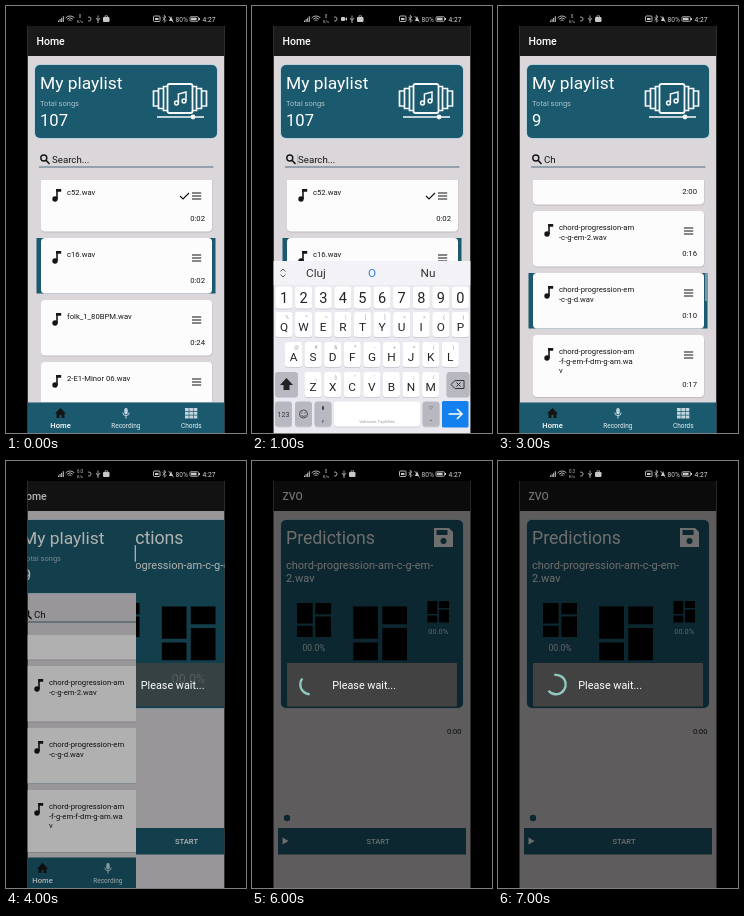
An HTML page with a canvas that plays this animation: 240x427 px, repeating every 8 s.

```html
<!DOCTYPE html>
<html lang="en">
<head>
<meta charset="utf-8">
<title>Playlist search</title>
<style>
html, body { margin: 0; width: 100%; height: 100%; overflow: hidden; background: #000; }
canvas { display: block; width: 240px; height: 427px; }
</style>
</head>
<body>
<canvas id="stage"></canvas>
<script>
const W = 240, H = 427, LEFT = 21.5, RIGHT = 218.5, STEP = 1000;
const TEAL = '#1b5a6e', PAPER = '#dad6d9', INK = '#151515';
const canvas = document.getElementById('stage');
const scale = Math.max(1, window.devicePixelRatio || 1);
canvas.width = W * scale;
canvas.height = H * scale;
const c = canvas.getContext('2d');

function text(s, x, y, size, color = '#fff', align = 'left', weight = 400) {
  c.font = `${weight} ${size}px Roboto, sans-serif`;
  c.fillStyle = color;
  c.textAlign = align;
  c.fillText(s, x, y);
}
function box(x, y, w, h, color, r = 0) {
  c.fillStyle = color;
  c.beginPath();
  c.roundRect(x, y, w, h, r);
  c.fill();
}
function frame(x, y, w, h, color, width, r = 0) {
  c.strokeStyle = color;
  c.lineWidth = width;
  c.beginPath();
  c.roundRect(x, y, w, h, r);
  c.stroke();
}
function line(points, color, width) {
  c.strokeStyle = color;
  c.lineWidth = width;
  c.beginPath();
  points.forEach(([x, y]) => c.lineTo(x, y));
  c.stroke();
}
function poly(points, color) {
  c.fillStyle = color;
  c.beginPath();
  points.forEach(([x, y]) => c.lineTo(x, y));
  c.fill();
}
function disc(x, y, r, color) {
  c.fillStyle = color;
  c.beginPath();
  c.arc(x, y, r, 0, 7);
  c.fill();
}
function ring(x, y, r, color, width, from = 0, to = 2 * Math.PI) {
  c.strokeStyle = color;
  c.lineWidth = width;
  c.beginPath();
  c.arc(x, y, r, from, to);
  c.stroke();
}
function clipped(x, y, w, h, dx, paint) {
  c.save();
  c.beginPath();
  c.rect(x, y, w, h);
  c.clip();
  c.translate(dx, 0);
  paint();
  c.restore();
}
const dim = a => box(LEFT, 20, RIGHT - LEFT, H - 20, `rgba(0,0,0,${a})`);

function statusBar(speed, recording) {
  const g = '#c9c9c9';
  for (let i = 0; i < 4; i++) box(52 + i * 1.6, 14.5 - i * 1.4, 1, 1.5 + i * 1.4, g);
  for (const r of [2, 4, 6]) ring(64, 16, r, g, 0.9, -2.4, -0.75);
  text(speed, 74, 12, 4.5, g, 'center');
  text('K/s', 74, 17, 4, g, 'center');
  ring(83, 13, 2, g, 0.9, -2, 2);
  let x = 92;
  if (recording) {
    box(89, 11, 4, 4, g, 1);
    poly([[93, 13], [95, 11], [95, 15]], g);
    x = 100;
  }
  line([[x, 9.5], [x, 17]], g, 0.8);
  line([[x - 2, 12], [x, 14.5], [x + 2, 12]], g, 0.8);
  box(x + 5, 11, 6.5, 5, g, 1);
  frame(x + 7, 9.8, 2.5, 2, g, 0.7);
  frame(147.5, 10, 6.5, 5.5, g, 0.9, 1);
  box(149, 12, 3.5, 2, g);
  line([[156.5, 11], [160, 14.5], [158.3, 16.3], [158.3, 9.2], [160, 11], [156.5, 14.5]], g, 0.7);
  poly([[163, 15], [165, 10], [167, 15]], g);
  line([[162.5, 10], [167.5, 16.5]], g, 0.7);
  text('80%', 169.5, 15.7, 6.6, g);
  frame(184, 10.7, 8.5, 4.6, g, 0.8, 1);
  box(185, 11.7, 5.6, 2.6, g);
  box(193, 12, 1, 2, g);
  text('4:27', 196.5, 15.8, 6.7, '#dcdcdc');
}

function header(title) {
  box(LEFT, 20, 197, 30, '#1a1a1a');
  text(title, 30.5, 39, 10.5, '#fff', 'left', 500);
}

function banner(height) {
  frame(29, 59, 182, height, 'rgba(150,205,225,.6)', 1.4, 5);
  box(29, 59, 182, height, TEAL, 5);
}

function note(x, y, color) {
  disc(x, y, 2.7, color);
  box(x + 1.2, y - 10, 1.6, 10, color);
  box(x + 1.2, y - 10, 5, 2.8, color);
}

function playerIcon() {
  const w = '#f4f8fa';
  frame(161.5, 78, 25, 29, w, 1.8, 2);
  for (const side of [-1, 1]) {
    [[16.5, 24], [21.5, 20], [26.5, 15]].forEach(([d, h]) => {
      const inner = side * (d - 4.5), outer = side * d, y = 92.5 - h / 2;
      line([[174 + inner, y], [174 + outer, y], [174 + outer, y + h], [174 + inner, y + h]], w, 1.7);
    });
  }
  ring(170.5, 97, 1.9, w, 1.5);
  ring(178, 95, 1.9, w, 1.5);
  line([[172.4, 97], [172.4, 88], [180, 86], [180, 95]], w, 1.5);
  line([[151, 111], [198, 111]], w, 1.5);
  disc(187, 111, 2.4, w);
}

function song(top, { lines, time, selected, checked }) {
  const extra = Math.max(0, lines.length - 2) * 6.5, height = 55.5 + extra;
  if (selected) box(30.5, top, 179, height, TEAL);
  else box(35, top + 1, 171.5, height, 'rgba(0,0,0,.12)', 4);
  box(35, top, 171, height, '#fdfcfd', 4);
  note(49, top + 23, INK);
  lines.forEach((s, i) => text(s, 61, top + 19 + i * 9.6, 7.7, INK));
  for (const dy of [17, 20, 23]) box(186, top + dy - 0.6, 9.2, 1.2, INK);
  if (checked) line([[174, top + 20], [177, top + 23], [183, top + 17]], INK, 1.2);
  text(time, 199, top + 45 + extra, 7.7, INK, 'right');
}

const allSongs = [
  { lines: ['c52.wav'], time: '0:02', checked: true },
  { lines: ['c16.wav'], time: '0:02', selected: true },
  { lines: ['folk_1_80BPM.wav'], time: '0:24' },
  { lines: ['2-E1-Minor 06.wav'], time: '0:08' }
];
const foundSongs = [
  { lines: ['chord-progression-am', '-am-em-am-g.wav'], time: '2:00' },
  { lines: ['chord-progression-am', '-c-g-em-2.wav'], time: '0:16' },
  { lines: ['chord-progression-em', '-c-g-d.wav'], time: '0:10', selected: true },
  { lines: ['chord-progression-am', '-f-g-em-f-dm-g-am.wa', 'v'], time: '0:17' }
];

function navBar() {
  const pale = '#c3d6de';
  box(LEFT, 396.5, 197, 31, TEAL);
  poly([[49, 407.5], [54.5, 402], [60, 407.5]], INK);
  box(50.5, 407, 8, 5, INK);
  box(53.5, 409, 2, 3, TEAL);
  text('Home', 54.5, 421.5, 7.6, '#fff', 'center', 500);
  box(118.3, 402, 3.4, 6.5, pale, 1.7);
  ring(120, 406.5, 3.2, pale, 0.9, 0, Math.PI);
  box(119.5, 409.5, 1, 3, pale);
  text('Recording', 119.8, 421.5, 6.5, '#e3ecf0', 'center');
  for (let i = 0; i < 9; i++) box(179 + (i % 3) * 4.3, 402 + Math.floor(i / 3) * 3.7, 3.7, 3, pale);
  text('Chords', 185.3, 421.5, 6.5, '#e3ecf0', 'center');
}

function homePage({ songs, count, query, scroll = 0, cursor }) {
  box(LEFT, 20, 197, 407, PAPER);
  header('Home');
  banner(73);
  text('My playlist', 34, 83.3, 17.4);
  text('Total songs', 34, 100, 7.5, '#a9c0c9');
  text(count, 34, 120.3, 16.6);
  playerIcon();
  ring(37.8, 152, 3, INK, 1.4);
  line([[40, 154.3], [43.5, 158]], INK, 1.6);
  text(query, 46, 157.3, 9.7, INK);
  if (cursor) box(45.5, 148, 0.6, 11, '#8a9ba3');
  box(33, 160.5, 174.5, 1, '#4d6f7e');
  clipped(LEFT, 174, 197, 222, 0, () => {
    songs.forEach((s, i) => song(170 + i * 62 - scroll, s));
    if (scroll) box(207, 226, 2, 69, 'rgba(215,210,225,.5)');
  });
  navBar();
}

function key(x, y, w, h, label, size, color = '#fff') {
  box(x, y + 1, w, h, '#cdcdd6', 3);
  box(x, y, w, h, color, 3);
  if (label) text(label, x + w / 2, y + h * 0.76, size, '#222', 'center');
}

function keyboard() {
  const grey = '#b8b8c1', pitch = 19.6;
  box(LEFT, 255, 197, 172, '#eae9f0');
  box(LEFT, 255, 197, 24, '#f3f2f7');
  line([[28.5, 265.5], [31, 263], [33.5, 265.5]], '#444', 0.9);
  line([[28.5, 268.5], [31, 271], [33.5, 268.5]], '#444', 0.9);
  text('Cluj', 64, 271, 11.8, '#333', 'center');
  text('O', 120, 271, 11.8, '#2f7fe0', 'center');
  text('Nu', 176, 271, 11.8, '#333', 'center');
  const rows = [
    ['1234567890', 32, 280.5, 22, 14.5, ''],
    ['QWERTYUIOP', 32, 306, 25, 11.8, '%^~|[]<>{}'],
    ['ASDFGHJKL', 41.5, 336, 25, 11.8, '@#&*-+=()'],
    ['ZXCVBNM', 61, 366, 25, 11.8, '_$"\':;/']
  ];
  for (const [letters, x0, y, h, size, marks] of rows) {
    [...letters].forEach((ch, i) => {
      const x = x0 + i * pitch;
      key(x - 8.5, y, 17, h, ch, size);
      if (marks) text(marks[i], x + 3, y + 7, 5, '#999', 'center');
    });
  }
  key(23, 366, 23, 25, '', 0, grey);
  poly([[34.5, 372], [41, 379], [37.5, 379], [37.5, 384], [31.5, 384], [31.5, 379], [28, 379]], '#222');
  key(194.5, 366, 23, 25, '', 0, grey);
  line([[199, 378.5], [203, 374.5], [212, 374.5], [212, 382.5], [203, 382.5], [199, 378.5]], '#333', 1);
  line([[204.5, 376.5], [208.5, 380.5]], '#333', 1);
  line([[208.5, 376.5], [204.5, 380.5]], '#333', 1);

  key(23, 395.5, 17, 25, '', 0, grey);
  text('123', 31.5, 411, 7, '#333', 'center');
  key(43, 395.5, 17, 25, '', 0, grey);
  ring(51.5, 408, 4, '#444', 0.9);
  ring(51.5, 408.5, 2, '#444', 0.8, 0.2, 2.9);
  disc(50, 406.8, 0.6, '#444');
  disc(53, 406.8, 0.6, '#444');
  key(62.5, 395.5, 17, 25, '', 0, grey);
  box(70, 400, 2, 4, '#444', 1);
  text(',', 71, 415, 10, '#333', 'center');
  key(82, 395.5, 86, 25, '');
  text('Velmarin TapGlide', 125, 417, 4.4, '#999', 'center');
  key(170.5, 395.5, 17, 25, '', 0, grey);
  text('!?', 179, 404, 5, '#666', 'center');
  text('.', 179, 415, 11, '#333', 'center');
  box(190, 395, 26.5, 26.5, '#1480f0', 1.5);
  line([[196.5, 408], [210, 408]], '#fff', 1.6);
  line([[205, 403], [210, 408], [205, 413]], '#fff', 1.6);
}

function tiles(x, y, s) {
  const w = s * 0.46, tall = s * 0.6, low = s * 0.33;
  box(x, y, w, tall, '#000');
  box(x, y + s - low, w, low, '#000');
  box(x + s - w, y, w, low, '#000');
  box(x + s - w, y + s - tall, w, tall, '#000');
}

function predictionsPage() {
  box(LEFT, 20, 197, 407, PAPER);
  header('ZVO');
  banner(188);
  text('Predictions', 34, 82.8, 17.7);
  poly([[182, 67], [197, 67], [201, 71], [201, 86], [182, 86]], '#fff');
  box(184.5, 69, 11, 5, TEAL);
  disc(191.5, 80, 3, TEAL);
  text('chord-progression-am-c-g-em-', 34, 107.5, 11);
  text('2.wav', 34, 120.5, 11);
  tiles(45, 142, 34);
  tiles(101.3, 145.5, 53.7);
  tiles(175.5, 140, 21.5);
  text('00.0%', 62, 190, 8.6, '#e4eef2', 'center');
  text('00.0%', 128, 222, 12.5, '#e4eef2', 'center');
  text('00.0%', 186.2, 173, 7.4, '#e4eef2', 'center');
  text('0:00', 209.5, 273, 7.5, INK, 'right');
  disc(35, 357, 3.2, TEAL);
  box(26, 367, 188, 26.5, TEAL);
  poly([[30.5, 376.5], [36.5, 380], [30.5, 383.5]], '#fff');
  text('START', 126, 383, 7.6, '#fff', 'center', 500);
}

function waitDialog(alpha = 1) {
  box(35, 202, 170, 43.5, `rgba(66,66,66,${alpha})`, 1);
  text('Please wait...', 80.3, 228, 10.8);
}

// Progress ring at each second: start angle and sweep.
const arcs = [[-0.35, 4.5], [1.6, 2.2], [-1.75, 4.2]];

const found = { songs: foundSongs, count: '9', query: 'Ch' };
const initial = { songs: allSongs, count: '107', query: 'Search...' };
const speeds = ['0', '0', '0', '0', '6.0', '1.8', '0', '0.3'];

function draw(step) {
  c.setTransform(scale, 0, 0, scale, 0, 0);
  box(0, 0, W, H, '#000');
  statusBar(speeds[step], step === 1);
  clipped(LEFT, 20, RIGHT - LEFT, H - 20, 0, () => {
    if (step < 2) {
      homePage({ ...initial, cursor: step === 1 });
      if (step === 1) keyboard();
    } else if (step < 4) {
      homePage({ ...found, scroll: step === 3 ? 27 : 0 });
    } else if (step === 4) {
      clipped(130, 20, RIGHT - 130, H - 20, 54.5, predictionsPage);
      clipped(LEFT, 20, 130 - LEFT, H - 20, -18, () => homePage({ ...found, scroll: 27 }));
      dim(0.3);
      clipped(130, 20, RIGHT - 130, H - 20, 54.5, () => waitDialog(0.75));
    } else {
      predictionsPage();
      dim(0.57);
      waitDialog();
      const [start, sweep] = arcs[step - 5];
      ring(58, 223.5, 9.7, '#8fc9bf', 2.3, start, start + sweep);
    }
  });
}

const begin = performance.now();
function tick() {
  draw(Math.floor((performance.now() - begin) / STEP) % speeds.length);
  requestAnimationFrame(tick);
}
tick();
</script>
</body>
</html>
```
